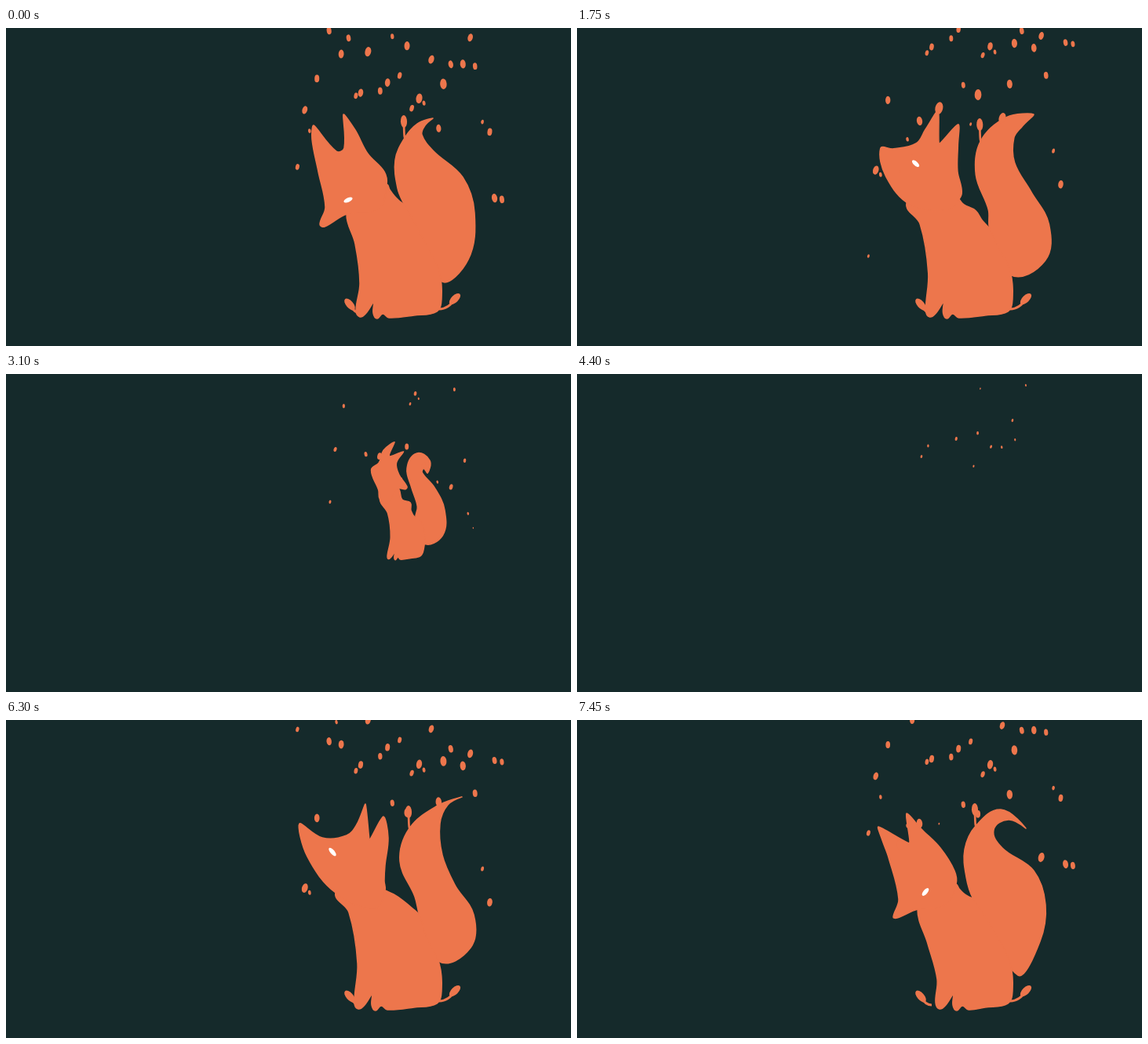
Recreate the animation shown at these times as an HTML page with a canvas. Size 720 px wide and 405 px high, loop 7.55 s.

```html
<!DOCTYPE html>
<html lang="en">
<head>
<meta charset="utf-8">
<title>Ember fox</title>
<style>
html, body { margin: 0; width: 100%; height: 100%; overflow: hidden; background: #152a2b; }
canvas { display: block; }
</style>
</head>
<body>
<canvas id="stage" width="720" height="405"></canvas>
<script>
const ctx = document.getElementById('stage').getContext('2d');
const LOOP = 7550, STEP = 94.1, LAST = 35, BURN = 26;
const BACK = '#152a2b', ORANGE = '#ed764c';

// Key poses as x,y landmarks, clockwise; the same landmark has the same index in each.
// back: nape to tail joint. front: shin to throat. paw: x of the front paw. eye: x, y, rx, degrees.
const poses = [
  { at: 0, paw: 446, eye: [436,219, 6, -25],
    head: [390,142, 392,124, 421,157, 431,153, 430,110, 445,130, 461,160, 482,183,
      485,200, 475,230, 434,237, 406,253, 400,250, 407,228, 398,183],
    back: [485,199, 489,206, 495,214, 501,220, 508,226],
    front: [451,325, 445,275, 434,237],
    tail: [508,226, 499,204, 496,168, 508,140, 524,122, 544,115, 534,124, 530,136,
      545,157, 582,190, 597,235, 589,295, 554,322] },
  { at: 3, paw: 457, eye: [444,219, 6, -50],
    head: [389,153, 384,136, 423,157, 424,154, 420,119, 440,140, 463,163, 481,192,
      483,209, 470,235, 434,241, 408,252, 403,251, 410,228, 397,175],
    back: [483,209, 487,215, 493,221, 499,225, 505,228],
    front: [459,330, 447,285, 434,241],
    tail: [505,228, 496,200, 494,165, 508,135, 540,114, 572,138, 550,127, 531,140,
      542,163, 582,192, 597,235, 590,282, 562,325] },
  { at: 10, paw: 453, eye: [399,196, 6, -28],
    head: [391,148, 395,126, 412,157, 419,156, 414,118, 428,138, 441,150, 464,163,
      474,192, 465,235, 417,221, 376,210, 362,201, 387,192, 397,179],
    back: [474,192, 478,205, 486,216, 499,227, 512,237],
    front: [452,310, 441,255, 417,222],
    tail: [512,237, 505,205, 508,178, 538,137, 590,122, 630,138, 597,136, 566,152,
      570,178, 606,215, 620,268, 600,311, 553,313] },
  { at: 15, paw: 444, eye: [416,168, 6.5, 50],
    head: [447,133, 458,107, 463,153, 464,152, 481,123, 487,150, 483,185, 482,205,
      483,217, 470,240, 420,220, 384,174, 374,132, 403,150, 434,147],
    back: [483,217, 494,222, 506,230, 518,240, 527,249],
    front: [448,310, 437,245, 420,220],
    tail: [527,249, 521,225, 502,180, 514,138, 550,109, 581,98, 563,108, 553,132,
      556,172, 572,210, 596,248, 592,290, 551,307] },
  { at: BURN, paw: 446, eye: [473,185, 4, 25],
    head: [436,119, 466,100, 456,128, 459,133, 499,122, 481,148, 490,175, 511,202,
      505,208, 482,207, 440,240, 420,230, 421,210, 404,164, 427,147],
    back: [483,206, 489,232, 513,239, 511,257, 523,274],
    front: [447,318, 438,263, 420,232],
    tail: [523,274, 533,248, 525,205, 515,160, 540,126, 584,142, 579,171, 567,161,
      562,170, 596,204, 616,255, 608,314, 552,332] }
];

// The seated lower body is shared; only the legs follow the paw.
for (const pose of poses) {
  const p = pose.paw;
  pose.body = [...pose.back, 535,275, 552,310, 555,345, 549,361, 520,366, p + 42,369, p + 34,364,
    p + 27,370, p + 22,363, p + 23,348, p + 13,363, p + 5,368, p,360, ...pose.front, 448,200];
}

const mix = (a, b, f) => a + (b - a) * f;
const random = seed => { const v = Math.sin(seed * 127.1) * 43758.5; return v - Math.floor(v); };

// Drawing number: counts up, pauses on an empty stage, counts back down.
function drawingAt(t) {
  return t < 4352 ? Math.floor((t + 4) / STEP) : LAST - Math.floor((t - 4352) / STEP);
}

function ellipse(x, y, rx, ry, deg, color = ORANGE) {
  ctx.fillStyle = color;
  ctx.beginPath();
  ctx.ellipse(x, y, rx, ry, deg * Math.PI / 180, 0, Math.PI * 2);
  ctx.fill();
}

// Closed smooth curve; turns sharper than a right angle become corners.
function blob(flat) {
  const n = flat.length / 2;
  const pt = i => { const j = (i + n) % n * 2; return [flat[j], flat[j + 1]]; };
  const gap = (a, b) => Math.hypot(b[0] - a[0], b[1] - a[1]) || .01;
  const handle = i => {
    const a = pt(i - 1), p = pt(i), b = pt(i + 1);
    const cos = ((p[0] - a[0]) * (b[0] - p[0]) + (p[1] - a[1]) * (b[1] - p[1])) / (gap(a, p) * gap(p, b));
    const s = .36 * Math.min(1, 1 + cos) / gap(a, b);
    return [(b[0] - a[0]) * s, (b[1] - a[1]) * s];
  };
  ctx.beginPath();
  ctx.moveTo(...pt(0));
  for (let i = 0; i < n; i++) {
    const p = pt(i), q = pt(i + 1), d = gap(p, q), u = handle(i), v = handle(i + 1);
    ctx.bezierCurveTo(p[0] + u[0] * d, p[1] + u[1] * d, q[0] - v[0] * d, q[1] - v[1] * d, ...q);
  }
  ctx.fillStyle = ctx.strokeStyle = ORANGE;
  ctx.lineWidth = 1.5;
  ctx.lineJoin = 'round';
  ctx.fill();
  ctx.stroke();
}

// A drop on a curved stem that grows out of the fox at x, y.
function bud(x, y, dx, dy, size) {
  if (size <= 0) return;
  ctx.strokeStyle = ORANGE;
  ctx.lineWidth = 3 * size;
  ctx.beginPath();
  ctx.moveTo(x, y);
  ctx.quadraticCurveTo(x + dx * .6, y, x + dx, y + dy);
  ctx.stroke();
  ellipse(x + dx, y + dy, 4.5 * size, 9 * size, Math.atan2(dx, -dy) * 57 * .8);
}

// The fox draws up into a thin flame as p goes from 0 to 1.
function burn(flat, p, k) {
  return flat.map((v, i) => i % 2
    ? mix(v, 70, p * p)
    : mix(v, 515, p ** 1.3) + 6 * p * Math.sin(flat[i + 1] / 40 + k));
}

function drawFox(k, p) {
  const i = Math.max(1, poses.findIndex(pose => Math.min(k, BURN) <= pose.at));
  const a = poses[i - 1], b = poses[i], f = (Math.min(k, BURN) - a.at) / (b.at - a.at);
  const shape = part => a[part].map((v, j) => mix(v, b[part][j], f));
  const tail = shape('tail'), [x, y, rx, deg] = shape('eye');

  for (const outline of [tail, shape('body'), shape('head')]) blob(burn(outline, p, k));
  if (p < .5) ellipse(...burn([x, y], p, k), rx * (1 - p), 2.7 * (1 - p), deg, '#fff');

  const size = Math.min(1, (BURN - k) / 8);
  bud(452, 363, -14, -11, size);
  bud(552, 358, 20, -13, size);
  bud(tail[6], tail[7], -1, -21, size * .9);
}

// Drops rise around the fox: low at its sides, only above it in the middle.
function drawEmbers(k, p) {
  for (let i = 1; i <= 30; i++) {
    if (random(i + .3) < p * .75) continue;
    const x = 362 + 276 * (i * .618 % 1);
    const floor = mix(130 + 210 * Math.min(1, Math.abs(x - 500) / 135) ** 3, 145, p);
    const life = (random(i) + k / (floor / 11)) % 1;
    const r = (1.5 + 4 * random(i + .6) * (1 - life * .5)) * Math.min(1, life * 8) * (1 - .65 * p);
    ellipse(mix(x, 510, .45 * p), floor * (1 - life), r, r * 1.6, 30 * random(i + .9) - 12);
  }
}

function draw(t) {
  const k = drawingAt(t), p = Math.max(0, (k - BURN) / (LAST - BURN));
  ctx.fillStyle = BACK;
  ctx.fillRect(0, 0, 720, 405);
  if (k > LAST) return;
  if (k < LAST) drawFox(k, p);
  drawEmbers(k, p);
}

let start;
function tick(now) {
  start ??= now;
  draw((now - start) % LOOP);
  requestAnimationFrame(tick);
}
requestAnimationFrame(tick);
</script>
</body>
</html>
```
